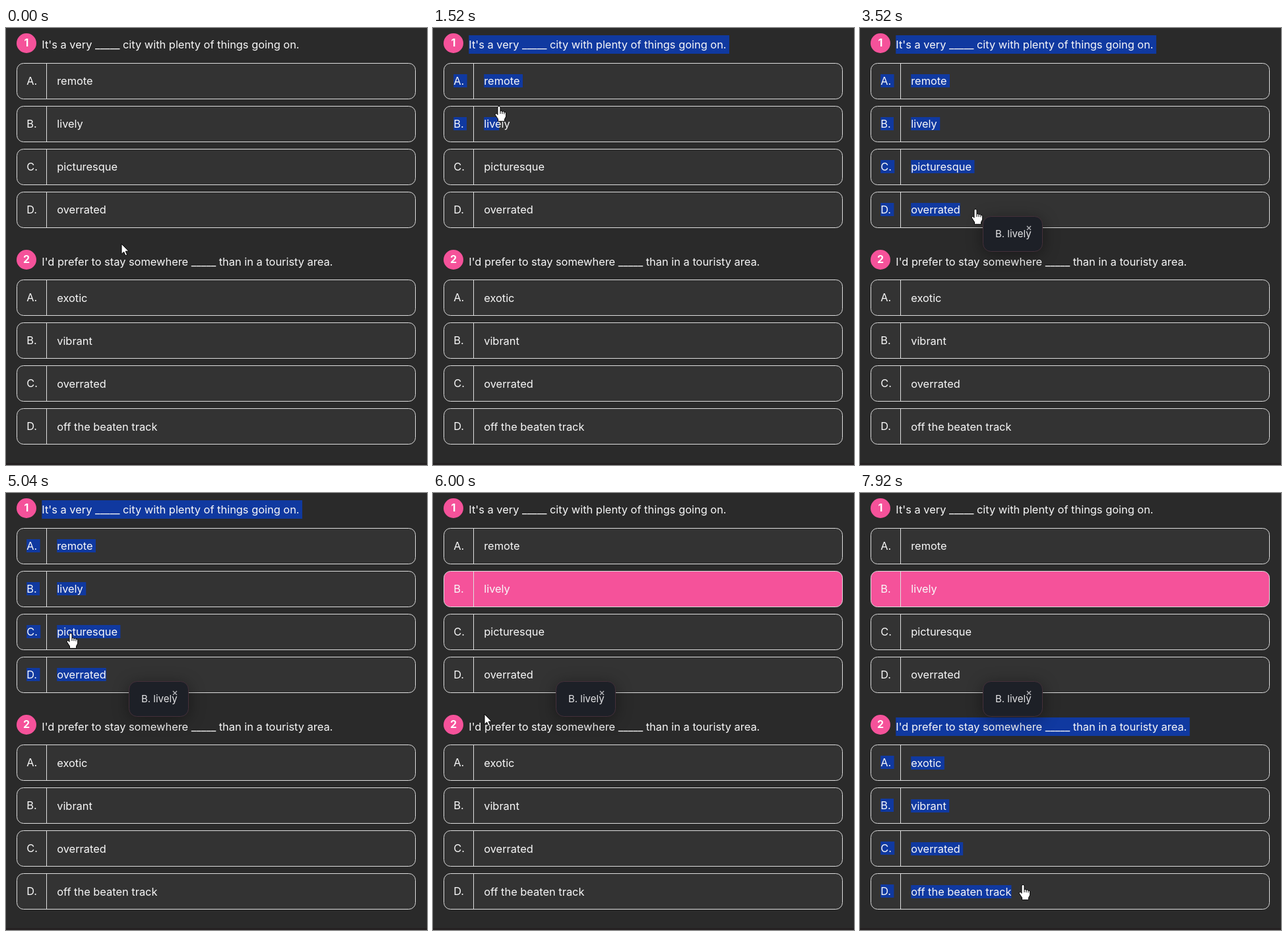
An HTML page that plays this animation: 638x662 px, repeating every 8000 ms.

```html
<!DOCTYPE html>
<html lang="en">
<head>
<meta charset="utf-8">
<title>Vocabulary quiz</title>
<style>
html, body { margin: 0; width: 100%; height: 100%; overflow: hidden; background: #2a2a2a; }
svg { display: block; width: 638px; height: 662px; }
text { font: 16.4px Inter, sans-serif; font-optical-sizing: none; fill: #f8f8f8; white-space: pre; }
.badge { fill: #f5529a; }
.number { font-size: 16px; font-weight: 700; text-anchor: middle; fill: #fff; }
.option { fill: #333; stroke: #dedede; }
.option.chosen { fill: #f5529a; }
.divider { stroke: #dedede; }
.selection { fill: #1039a0; }
.popup { filter: drop-shadow(0 4px 12px #0006); }
.popup rect { fill: #1d2027; stroke: #44303a; }
.popup text { font-size: 15px; fill: #e4e4e6; }
.close { stroke: #b8b8bc; stroke-width: 1.3; }
.pointer { fill: #fff; stroke: #000; stroke-linejoin: round; }
</style>
</head>
<body>
<svg id="stage" viewBox="0 0 638 662"></svg>
<script>
const LOOP = 8000;
const stage = document.getElementById('stage');

function add(tag, attrs, parent = stage, content = '') {
  const node = document.createElementNS('http://www.w3.org/2000/svg', tag);
  for (const [key, value] of Object.entries(attrs)) node.setAttribute(key, value);
  node.textContent = content;
  parent.append(node);
  return node;
}

// A piece of text with a selection rectangle behind it.
function addSelectable(content, x, baseline, row, top, height) {
  const rect = add('rect', { class: 'selection', x, y: top, width: 0, height });
  const text = add('text', { x, y: baseline }, stage, content);
  return { rect, x, row, length: text.getComputedTextLength() };
}

function addQuestion(number, title, answers, titleBase, badgeY, firstTop, textShift) {
  add('circle', { class: 'badge', cx: 31, cy: badgeY, r: 15 });
  add('text', { class: 'number', x: 31, y: badgeY + 5 }, stage, number);
  const parts = [addSelectable(title, 54.3, titleBase, 0, titleBase - 20, 28)];
  const tops = answers.map((_, i) => firstTop + i * 65);
  const boxes = answers.map((answer, i) => {
    const top = tops[i];
    const box = add('rect', { class: 'option', x: 16.5, y: top + 0.5, width: 604, height: 54, rx: 10 });
    add('path', { class: 'divider', d: `M61.5 ${top + 1}v53` });
    parts.push(
      addSelectable('ABCD'[i] + '.', 31.2, top + 33, i + 1, top + 17, 20),
      addSelectable(answer, 77.2, top + 33 + textShift, i + 1, top + 17 + textShift, 20));
    return box;
  });
  return { parts, tops, boxes };
}

const first = addQuestion(1, "It's a very _____ city with plenty of things going on.",
  ['remote', 'lively', 'picturesque', 'overrated'], 31, 23, 53, 0);
const second = addQuestion(2, "I'd prefer to stay somewhere _____ than in a touristy area.",
  ['exotic', 'vibrant', 'overrated', 'off the beaten track'], 360, 351, 381, 1);

add('rect', { x: 0, y: 659, width: 638, height: 3, fill: '#252122' });

const popup = add('g', { class: 'popup' });
add('rect', { x: 186.5, y: 285.5, width: 90, height: 53, rx: 12 }, popup);
add('text', { x: 205, y: 317 }, popup, 'B. lively');
add('path', { class: 'close', d: 'M253 300l6 6m0-6l-6 6' }, popup);

const arrow = add('path', { class: 'pointer', d: 'M0 0V15.5L3.6 12.2 6 17.7 8.6 16.6 6.2 11.2H11Z' });
const hand = add('path', { class: 'pointer', d:
  'M-2 1.5Q0-1 2 1.5V8Q4 6.5 5 8.6 7 7.3 8 9.3 10.5 8.6 10.7 11V16L8.6 20V23.3H-1.5V20' +
  'L-5.7 13.6Q-6.2 11 -4 11.4L-2 13.4ZM2 8v4M5 8.6v3.6M8 9.3v3.2' });

// Pointer path: time, x, y
const path = [
  [0, 175, 327], [860, 52, 17], [1000, 52, 17], [2220, 175, 276], [2700, 175, 275],
  [3400, 175, 274], [4240, 175, 274], [5040, 98, 212], [5360, 104, 147], [5460, 104, 147],
  [6000, 78, 335], [6320, 53, 347], [6520, 53, 347], [7680, 246, 592], [7920, 247, 593], [LOOP, 247, 593]
];

function pointerAt(time) {
  const next = Math.max(1, path.findIndex(key => key[0] > time));
  const [t0, x0, y0] = path[next - 1], [t1, x1, y1] = path[next];
  const p = (time - t0) / (t1 - t0), ease = p * p * (3 - 2 * p);
  return { x: x0 + (x1 - x0) * ease, y: y0 + (y1 - y0) * ease };
}

function select({ parts, tops }, active, caret) {
  const row = tops.filter(top => top <= caret.y).length;
  for (const part of parts) {
    const passed = part.row < row || (part.row === row && row > 0 && part.x < 60 && caret.x > 77);
    const width = passed ? part.length + 4.4 : Math.min(part.length, Math.max(0, caret.x - part.x));
    part.rect.setAttribute('width', active && part.row <= row ? width : 0);
  }
}

const show = (node, visible) => node.setAttribute('visibility', visible ? 'visible' : 'hidden');

function draw(now) {
  const time = now % LOOP;
  const pointer = pointerAt(time);
  select(first, time >= 1000 && time < 5400, pointerAt(Math.min(time, 2220)));
  select(second, time >= 6520, pointerAt(Math.min(time, 7680)));
  first.boxes[1].classList.toggle('chosen', time >= 5400);
  show(popup, time >= 3200);

  const overOption = [...first.tops, ...second.tops].some(top => pointer.y >= top && pointer.y <= top + 55);
  show(hand, overOption);
  show(arrow, !overOption);
  const place = `translate(${Math.round(pointer.x)} ${Math.round(pointer.y)})`;
  hand.setAttribute('transform', place);
  arrow.setAttribute('transform', place);
}

const start = performance.now();
function tick() {
  draw(performance.now() - start);
  requestAnimationFrame(tick);
}
tick();
</script>
</body>
</html>
```
